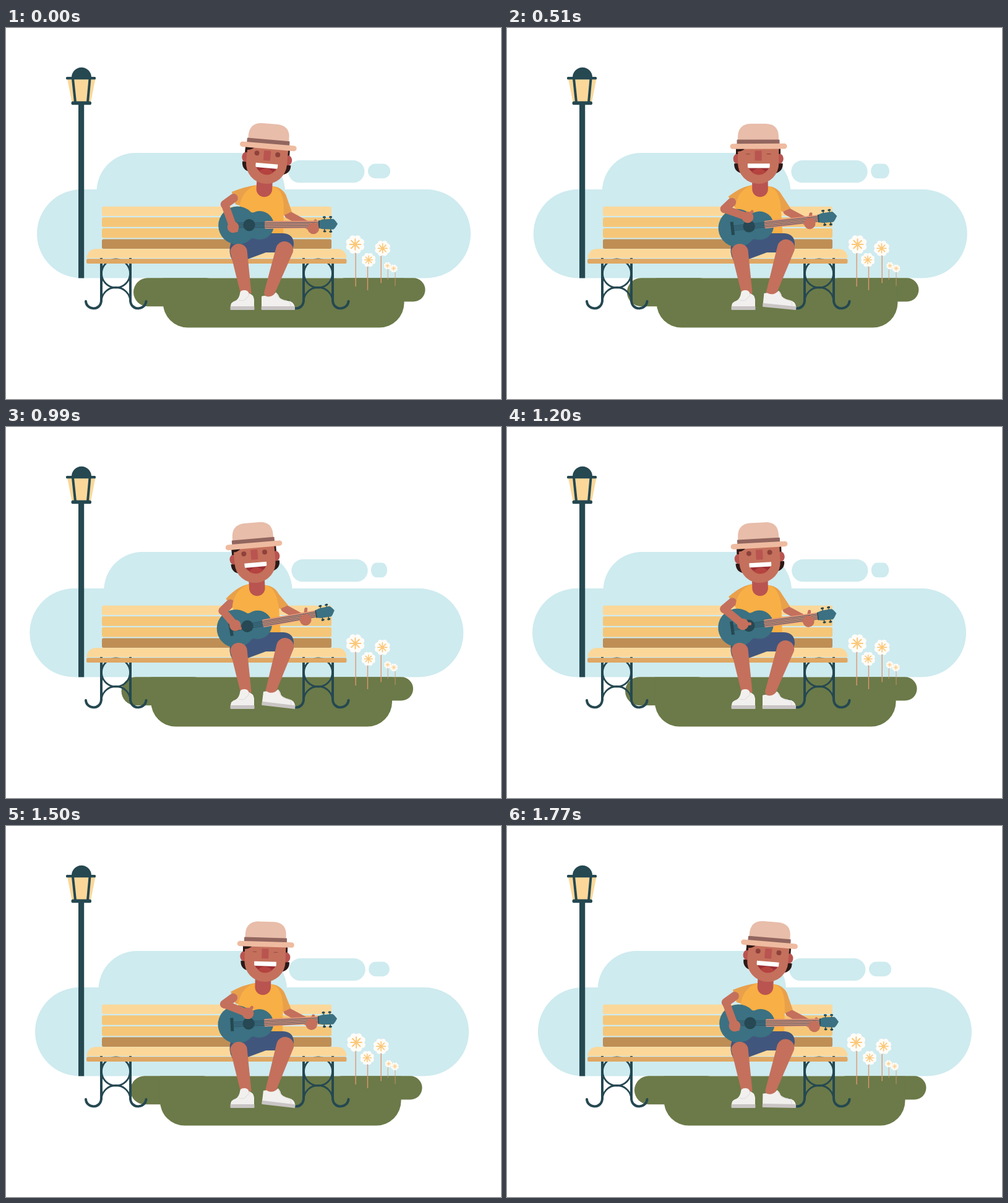
Recreate the animation shown at these times as an HTML page. Size 800x600 px, loop 1.8 s.

```html
<!DOCTYPE html>
<html lang="en">
<head>
<meta charset="utf-8">
<title>Guitar on a park bench</title>
<style>
  html, body { margin: 0; width: 100%; height: 100%; overflow: hidden; background: #fff; }
  svg { display: block; width: 100%; height: 100%; }
  .sky { fill: #ceebef; }
  .grass { fill: #6b7a48; }
  .dark { fill: #254851; }
  .iron { fill: none; stroke: #254851; stroke-width: 4; }
  .pale { fill: #fbd89a; }
  .skin { fill: #c4705c; }
  .limb { fill: none; stroke: #c4705c; stroke-linecap: round; stroke-linejoin: round; }
  .blush { fill: #b95450; }
  .sleeve { fill: #e9a04b; }
  .shirt { fill: #f8af45; }
  .navy { fill: #41567d; }
  .wood { fill: #3b7182; }
  .hair { fill: #2d1917; }
  .shoe { fill: #f2f0ee; }
  .sole { fill: #cac5c5; }
  .seam { fill: none; stroke: #d9d5d3; stroke-width: .8; }
</style>
</head>
<body>
<svg viewBox="0 0 800 600">
  <defs>
    <g id="benchLeg">
      <path class="iron" d="M154 371V440C154 458 130 457 129 442M201 371V440C201 458 225 457 226.500 442" stroke-linecap="round"/>
      <circle class="iron" cx="177.500" cy="397" r="23" style="stroke-width:2.800"/>
      <path class="iron" d="M154 443A23.500 23.500 0 0 1 201 443" style="stroke-width:2.800"/>
    </g>
  </defs>

  <rect id="sky" class="sky" x="44" y="261" width="701" height="143.500" rx="71.750"/>
  <rect id="hump" class="sky" x="152.500" y="202" width="304.500" height="125" rx="62.500"/>
  <rect id="cloud" class="sky" x="458.800" y="214" width="123.300" height="36.300" rx="18.150"/>
  <rect id="puff" class="sky" x="-18" y="219.500" width="36" height="23.800" rx="11.900"/>

  <g id="ground" class="grass">
    <rect x="196" y="404.300" width="140" height="46" rx="23"/>
    <rect x="520" y="404.300" width="147.500" height="38.200" rx="19.100"/>
    <path d="M243.800 440V404.500H633.500V444.500A40 40 0 0 1 593.500 484.500H283.800A40 40 0 0 1 243.800 444.500Z"/>
  </g>

  <g id="lamp">
    <rect class="dark" x="117" y="120" width="9.200" height="284.500"/>
    <path class="pale" d="M99 82H144.500L137 120H106.500Z"/>
    <path class="iron" d="M108 82L112 120M135.500 82L132 120"/>
    <rect class="dark" x="105.500" y="118.500" width="32.500" height="5.800" rx="2.900"/>
    <rect class="dark" x="97" y="79" width="48" height="4.200" rx="1.500"/>
    <path class="dark" d="M106 80A16 16.300 0 0 1 138 80Z"/>
  </g>

  <g id="bench">
    <use href="#benchLeg"/>
    <use href="#benchLeg" x="327"/>
    <rect class="pale" x="155" y="288.800" width="371" height="15.200" rx="2.500"/>
    <rect x="155" y="306.300" width="371" height="15.400" rx="2.500" fill="#f5c678"/>
    <rect x="155" y="324" width="371" height="15.400" rx="2.500" fill="#f5c678"/>
    <rect x="155" y="341.600" width="371" height="15.400" rx="2.500" fill="#bf8e55"/>
    <path class="pale" d="M130.500 372Q132 357.300 146 357.300H535Q549 357.300 550.500 372Z"/>
    <rect x="130" y="373.200" width="420.500" height="7.800" rx="2.500" fill="#dfa763"/>
  </g>

  <g id="flowers"></g>

  <path id="leftSleeve" class="sleeve"/>
  <path id="leftUpper" class="limb" stroke-width="14"/>
  <path id="rightArm" class="limb" stroke-width="12.500"/>
  <path id="rightSleeve" class="sleeve"/>
  <path id="shirt" class="shirt"/>
  <path id="neck" class="blush"/>

  <path class="navy" d="M366 376Q358 362 364 346L395 332H448Q465 333 465 350Q464 359 458 365L437 363H420L389 374.500Z"/>

  <g id="guitar">
    <circle class="wood" cx="-19" cy=".5" r="30.800"/>
    <circle class="wood" cx="17" cy=".5" r="23"/>
    <path class="wood" d="M-8 -28Q0 -19 8 -20.500V21.500Q0 20 -8 29Z"/>
    <circle class="dark" r="9.700"/>
    <rect class="dark" x="-29.500" y="-10.500" width="5" height="21.500"/>
    <path id="thumb" class="limb" stroke-width="5"/>
    <path d="M27 -6.300H113V5.500L27 6.300Q25 6.300 25 4.300V-4.300Q25 -6.300 27 -6.300Z" fill="#dd9277"/>
    <path d="M-27 -3.600H113M-27 -1.200H113M-27 1.400H113M-27 3.900H113" stroke="#2c4a5c" stroke-width=".8"/>
    <g class="dark">
      <path d="M121 -10h1.500v21h-1.500zM131 -10h1.500v21h-1.500z"/>
      <ellipse cx="121.500" cy="-11.800" rx="2.600" ry="1.700"/><ellipse cx="131.700" cy="-12" rx="2.600" ry="1.700"/>
      <ellipse cx="122" cy="11" rx="2.600" ry="1.700"/><ellipse cx="131.700" cy="11.500" rx="2.600" ry="1.700"/>
    </g>
    <path class="wood" d="M113 -6.500L119 -8.300L136 -9Q138 -8.500 143 -1Q138 7.500 136 8L119 7.500L113 6Z"/>
    <rect class="dark" x="112" y="-6.500" width="1.600" height="12.600"/>
    <circle id="fretHand" class="skin" cy="6" r="9.300"/>
  </g>

  <path class="skin" d="M362.300 362A13.900 13.900 0 0 1 389.500 359L396.500 428Q390 436 379 429Z"/>
  <path class="shoe" d="M362.800 451Q363 443 371 441Q377 438 378.500 427Q380 424 385 424Q391 424 392.500 429Q400 431 401 439V451Z"/>
  <path class="seam" d="M376 440Q386 443 389 436Q393 435 392.500 429"/>
  <rect class="sole" x="362.500" y="450" width="39" height="6" rx="1"/>

  <path id="rightLeg" class="skin"/>
  <g id="rightShoe">
    <path class="shoe" d="M413 451V434Q418 432 421 434Q430 436 436 427.500Q440 430 442 436Q446 440 455 441Q465 442 466.800 451Z"/>
    <path class="seam" d="M437 429Q441 441 457 442Q460 445 460 450"/>
    <rect class="sole" x="412.700" y="450" width="54.300" height="6" rx="1"/>
  </g>

  <g id="head">
    <path class="hair" d="M369.500 190H441.500V219H445Q446 231 434 235H379Q366 232 366.500 219H369.500Z"/>
    <ellipse class="blush" cx="371.300" cy="211.500" rx="6.200" ry="8"/>
    <ellipse class="blush" cx="440" cy="211.500" rx="6.200" ry="8"/>
    <path class="skin" d="M372.500 190H438.700V219A33.100 33.100 0 0 1 372.500 219Z"/>
    <path class="hair" d="M369.500 190H387Q384 199 372.500 200V204H369.500Z"/>
    <g fill="#8f423c"><ellipse id="eyeL" cx="388.700" cy="203.700" rx="4"/><ellipse id="eyeR" cx="422.500" cy="203.700" rx="4"/></g>
    <rect class="blush" x="400" y="198.500" width="11" height="16" rx=".8"/>
    <path d="M389.500 225H423A17 12.500 0 0 1 389.500 225Z" fill="#9c2f35"/>
    <path d="M394.500 233Q406 221.500 418 233Q406 242 394.500 233Z" fill="#b5433f"/>
    <path d="M388.300 219.300H424V224.500Q424 226.500 422 226.500H390.300Q388.300 226.500 388.300 224.500Z" fill="#fff"/>
    <g id="hat">
      <path d="M372.500 182V176Q373 154.700 395 154.700H417Q438.500 155 438.500 176V182Z" fill="#e8bdaa"/>
      <rect x="371" y="180.500" width="69" height="8" rx="1" fill="#92665f"/>
      <rect x="360" y="187" width="92" height="8.600" rx="4.300" fill="#efbba0"/>
    </g>
  </g>

  <path id="forearm" class="limb" stroke-width="12.500"/>
  <circle id="strumHand" class="skin" r="9.300"/>
  <path id="finger" class="limb" stroke-width="5"/>
</svg>

<script>
const LOOP = 1800, BEAT = 900, TAP = 600, RAD = Math.PI / 180;
const el = id => document.getElementById(id);
const set = (id, attrs) => { for (const k in attrs) el(id).setAttribute(k, attrs[k]); };
const path = (id, d) => set(id, { d });
const slide = (id, x, y = 0) => set(id, { transform: `translate(${x} ${y})` });
const smooth = (a, b, x) => {
  const u = Math.min(1, Math.max(0, (x - a) / (b - a)));
  return u * u * (3 - 2 * u);
};

// Strumming hand over one beat: phase, x, y, finger angle
const STRUM = [
  [0, 367, 322, 45], [.267, 377, 319, 8], [.333, 381, 319, -3], [.567, 389, 306, -51],
  [.667, 391, 303, -57], [.867, 381, 326, -16], [.967, 368, 323.2, 44]
];

// Smooth periodic curve through the keys
function track(keys, p) {
  const n = keys.length;
  const at = i => {
    const k = keys[(i + n) % n];
    return [k[0] + Math.floor(i / n), ...k.slice(1)];
  };
  let i = n - 1;
  while (keys[i][0] > p) i--;
  const [a, b, c, d] = [at(i - 1), at(i), at(i + 1), at(i + 2)];
  const h = c[0] - b[0], u = (p - b[0]) / h;
  return [1, 2, 3].map(j => {
    const m0 = (c[j] - a[j]) / (c[0] - a[0]) * h;
    const m1 = (d[j] - b[j]) / (d[0] - b[0]) * h;
    const s = u * u * (3 - 2 * u);
    return b[j] + (c[j] - b[j]) * s + m0 * u * (1 - u) ** 2 - m1 * u * u * (1 - u);
  });
}

// x, y, radius, sway, stem x, stem end
const FLOWERS = [
  [565.500, 350, 15.500, -1.200, 565.200, 418], [607, 356.300, 13, 1.700, 606.200, 412.500],
  [584.500, 375, 11.500, 1.600, 584.500, 424], [617.800, 384.500, 6, -1.200, 617.200, 407],
  [627.800, 388.800, 6.500, -1.300, 629, 417]
];

function flowerMarkup([, y, r, , stem, end], i) {
  let petals = '', rays = '';
  for (let k = 0; k < 8; k++) {
    const a = (k * 45 + 22.5) * RAD, b = k * 45 * RAD;
    petals += `<circle cx="${r * .66 * Math.cos(a)}" cy="${r * .66 * Math.sin(a)}" r="${r * .34}"/>`;
    rays += `M0 0L${r * .57 * Math.cos(b)} ${r * .57 * Math.sin(b)}`;
  }
  return `<path d="M${stem} ${y}V${end}" stroke="#e0966f" stroke-width="${r > 8 ? 1.4 : .8}"/>
    <g id="bloom${i}"><g fill="#fffcf8">${petals}<circle r="${r * .72}"/></g>
    <path d="${rays}" stroke="#fbc879" stroke-width="${r * .13}" stroke-linecap="round"/></g>`;
}
el('flowers').innerHTML = FLOWERS.map(flowerMarkup).join('');

function drawScenery(c, sway) {
  slide('sky', 6 * c);
  slide('hump', -6 * c);
  slide('cloud', -2.7 * c);
  slide('ground', 10 * c);
  set('puff', { transform: `translate(603 0) scale(${(31 + 5 * c) / 36} 1)` });
  FLOWERS.forEach(([x, y, , amp], i) => slide('bloom' + i, x + amp * sway, y));
}

function drawTorso(c, nx, dip) {
  // Left sleeve runs from the shoulder to a cuff square to the arm
  const sx = nx - 20, sy = 266 + dip;
  const ex = nx - 46.5 - 3 * c, ey = 280.5 - 5.5 * c + dip;
  const len = Math.hypot(ex - sx, ey - sy);
  const px = (ey - sy) / len * 10.5, py = (sx - ex) / len * 10.5;
  const elbow = [352 + 1.8 * c, 291.3 - 6.2 * c + dip];
  path('leftSleeve', `M${ex - px} ${ey - py}Q${nx - 30} ${256 + dip} ${nx - 12} ${254 + dip}L${nx - 15} ${290 + dip}L${nx - 36} ${288 + dip}L${ex + px} ${ey + py}Z`);
  path('leftUpper', `M${ex} ${ey}L${elbow}`);

  const ox = 458.8 + 3 * c, oy = 292.5 + 4.5 * c + dip;
  path('rightSleeve', `M${nx + 8} ${255.5 + dip}Q${nx + 27} ${255 + dip} ${nx + 35} ${270 + dip}L${ox} ${oy}L${ox - 13} ${oy + 6}L${nx + 22} ${285 + dip}Z`);
  path('shirt', `M${nx - 14} ${254.5 + dip}Q${nx - 37} ${263 + dip} ${nx - 40} ${290 + dip}L380 336H${446 + 2 * c}L${nx + 33.5 - 2 * c} ${295 + dip}Q${nx + 32} ${259 + dip} ${nx + 13} ${256 + dip}Z`);
  path('neck', `M${nx - 12.8 + c} 240H${nx + 12.8 + c}L${nx + 12.8} ${260.5 + dip}A12.8 12.8 0 0 1 ${nx - 12.8} ${260.5 + dip}Z`);
  return { elbow, cuff: [ox - 6, oy + 3] };
}

function drawGuitar(c, dip, cuff) {
  const x = 391.5 + 1.5 * c, y = 320.5 - 1.8 * c + dip * .9, angle = -5.3 + 4.9 * c;
  const hand = 99 + 4.7 * c, a = angle * RAD;
  set('guitar', { transform: `translate(${x} ${y}) rotate(${angle})` });
  set('fretHand', { cx: hand });
  path('thumb', `M${hand} 0L${hand + 3.5} ${-8.5 + 2.5 * c}`);
  const hx = x + hand * Math.cos(a) - 6 * Math.sin(a);
  const hy = y + hand * Math.sin(a) + 6 * Math.cos(a);
  path('rightArm', `M${cuff}L${cuff[0] + .5} ${cuff[1] + 2}L${hx} ${hy}`);
}

function drawStrum(elbow, beat) {
  const [x, y, angle] = track(STRUM, beat), a = angle * RAD;
  const reach = 11.5 - 3.5 * smooth(15, 45, angle);
  path('forearm', `M${elbow}L${x} ${y}`);
  set('strumHand', { cx: x, cy: y });
  path('finger', `M${x} ${y}L${x + reach * Math.cos(a)} ${y + reach * Math.sin(a)}`);
}

function drawHead(phase, beat, dip) {
  const x = 411.5 + 12.6 * Math.cos(phase + 11 * RAD);
  const tilt = 5 * Math.cos(phase - 10 * RAD);
  set('head', { transform: `translate(${x} ${191 + dip}) rotate(${tilt}) translate(-406 -191)` });
  slide('hat', 0, -.7 * dip);
  const open = 1 - .87 * smooth(.44, .57, beat) + .87 * smooth(.69, .8, beat);
  set('eyeL', { ry: 4 * open });
  set('eyeR', { ry: 4 * open });
}

function drawFoot(tap) {
  const lift = smooth(0, .52, tap) * (1 - smooth(.8, 1, tap));
  const k = 4 * lift, ax = 2.5 * lift, ay = -2 * lift;
  set('rightShoe', { transform: `rotate(${6.8 * lift} 465 456)` });
  path('rightLeg', `M${436.3 + lift} ${356 - k}A14 14 0 0 1 ${463.8 + lift} ${362.5 - k}L${434 + ax} ${430 + ay}Q${429 + ax} ${437 + ay} ${421 + ax} ${434 + ay}Q${416 + ax} ${432 + ay} ${417.5 + ax} ${426 + ay}Z`);
}

function draw(now) {
  const t = now % LOOP, phase = t / LOOP * 2 * Math.PI;
  const beat = t % BEAT / BEAT, c = Math.cos(phase);
  const dip = 3.7 * Math.exp(-(((beat - .84) / .06) ** 2));
  const nx = 411.3 + 6.2 * Math.cos(phase + 9 * RAD);
  drawScenery(c, Math.cos(2 * phase));
  const { elbow, cuff } = drawTorso(c, nx, dip);
  drawGuitar(c, dip, cuff);
  drawStrum(elbow, beat);
  drawHead(phase, beat, dip);
  drawFoot(t % TAP / TAP);
}

function frame() {
  draw(performance.now());
  requestAnimationFrame(frame);
}
frame();
</script>
</body>
</html>
```
